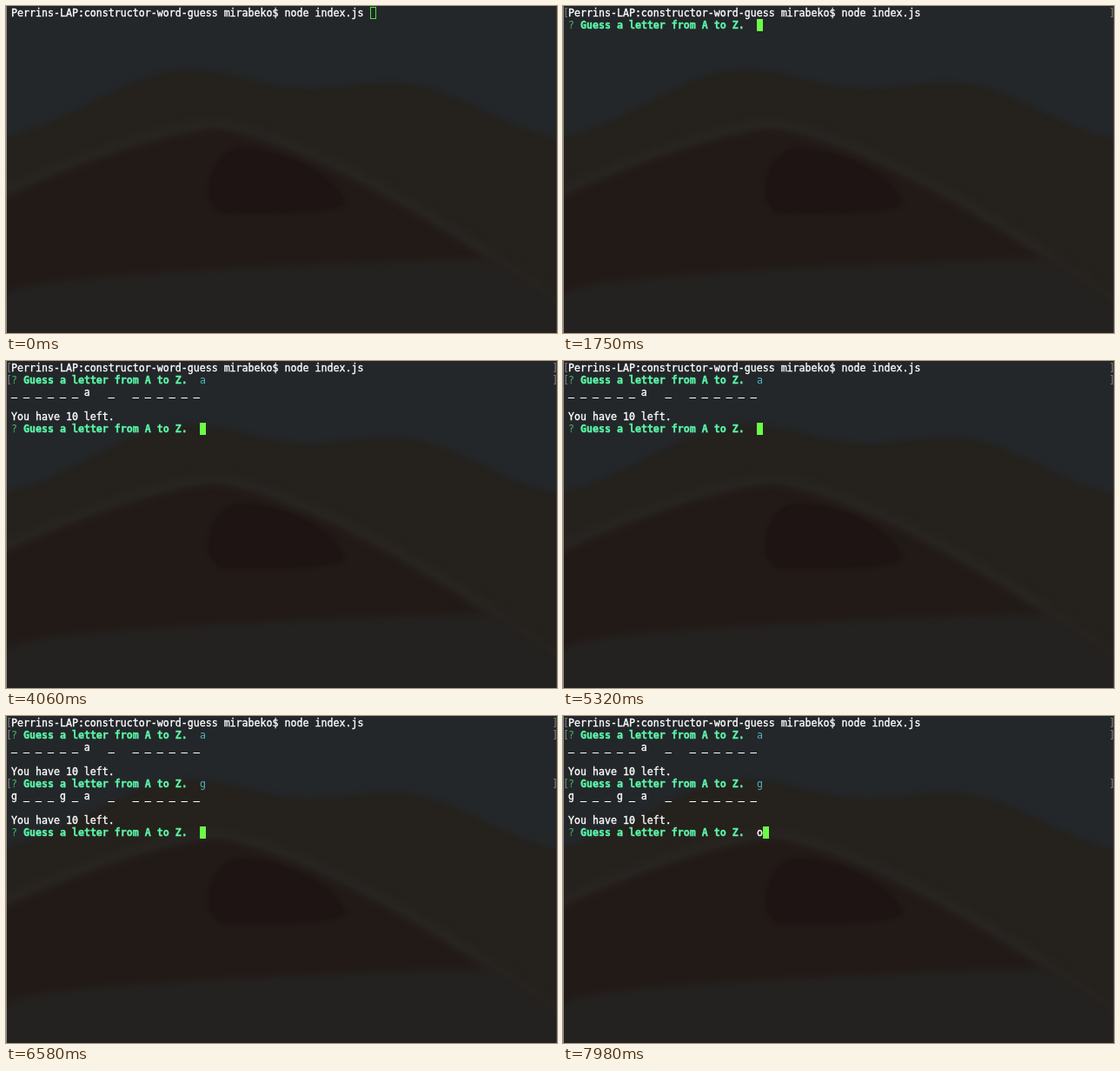
Animation of 634x376 px, one loop 8000 ms. Source, as an HTML page with a canvas:

```html
<!DOCTYPE html>
<html lang="en">
<head>
<meta charset="utf-8">
<title>Word guess terminal</title>
<style>
  html, body { margin: 0; width: 100%; height: 100%; overflow: hidden; background: #211c1a; }
  #stage { position: relative; width: 634px; height: 376px; overflow: hidden; }
  canvas { position: absolute; left: 0; top: 0; }
  span {
    position: absolute; white-space: pre; color: #fff;
    font: 11.627px/14px "DejaVu Sans Mono", "Noto Sans Mono", monospace;
    -webkit-text-stroke: .35px currentColor;
  }
  .mark { color: #43b866; -webkit-text-stroke: 0; }
  .ask { color: #5cf7a8; font-weight: bold; }
  .answer { color: #4fb2c2; -webkit-text-stroke: 0; }
  .edge { color: #85898b; -webkit-text-stroke: 0; }
  #cursor { position: absolute; box-sizing: border-box; width: 7px; height: 14px; background: #6dfc48; }
  #cursor.hollow { background: none; border: 1px solid #4fe03c; }
</style>
</head>
<body>
<div id="stage"><canvas width="634" height="376"></canvas></div>
<script>
const WIDTH = 634, HEIGHT = 376, LOOP = 8000, BLINK = 525, REDRAW = 280;
const CELL = 7, LINE = 14, LEFT = 6, TOP = 1;
const stage = document.getElementById('stage');
const ctx = stage.querySelector('canvas').getContext('2d');

// Background dunes
const bump = (x, center, width) => Math.exp(-(((x - center) / width) ** 2));
const horizon = x => 165 - 90 * bump(x, 205, 150) - 71 * bump(x, 460, 130);
const ridge = x => 138 + (x < 240 ? 77 : 102) * (Math.abs(x - 240) / 240) ** 1.4;
const foreground = x => Math.max(ridge(x), 335 - 44 * (Math.max(x, 0) / 525) ** 0.4);

function contour(height) {
  const path = new Path2D();
  for (let x = -20; x <= WIDTH + 20; x += 6) path.lineTo(x, height(x));
  return path;
}

function dune(height, color, blur) {
  const path = contour(height);
  path.lineTo(WIDTH + 20, HEIGHT + 20);
  path.lineTo(-20, HEIGHT + 20);
  ctx.filter = `blur(${blur}px)`;
  ctx.fillStyle = color;
  ctx.fill(path);
}

function drawHollow() {
  ctx.filter = 'blur(2px)';
  ctx.fillStyle = '#1d1413';
  ctx.beginPath();
  ctx.moveTo(233, 222);
  ctx.bezierCurveTo(230, 190, 248, 160, 275, 164);
  ctx.bezierCurveTo(340, 168, 385, 205, 391, 226);
  ctx.bezierCurveTo(385, 242, 270, 238, 245, 238);
  ctx.fill();
}

function drawScene() {
  ctx.fillStyle = '#23272a';
  ctx.fillRect(0, 0, WIDTH, HEIGHT);
  dune(horizon, '#25211c', 3);
  dune(ridge, '#221a17', 3);
  ctx.filter = 'blur(5px)';
  ctx.strokeStyle = '#282522';
  ctx.lineWidth = 12;
  ctx.stroke(contour(x => ridge(x) - 3));
  drawHollow();
  dune(foreground, '#242220', 4);
  ctx.filter = 'none';
  ctx.fillStyle = '#8f8d88';
  ctx.fillRect(0, 0, 1, HEIGHT);
  ctx.fillStyle = '#3a3c3d';
  ctx.fillRect(WIDTH - 1, 0, 1, HEIGHT);
}

// Terminal text
const items = [];

function place(el, row, col) {
  el.style.left = LEFT + col * CELL + 'px';
  el.style.top = TOP + row * LINE + 'px';
}

function write(row, col, text, start = 0, end = LOOP, kind = '') {
  const el = document.createElement('span');
  el.textContent = text;
  el.className = kind;
  place(el, row, col);
  stage.append(el);
  items.push({ el, start, end });
}

function brackets(row, start) {
  write(row, -0.85, '[', start, LOOP, 'edge');
  write(row, 88.9, ']', start, LOOP, 'edge');
}

const question = 'Guess a letter from A to Z.';
const answerCol = question.length + 4;

function prompt(row, start, end) {
  write(row, 0, '?', start, end, 'mark');
  write(row, 2, question, start, end, 'ask');
}

const board = guessed => [...'g___g_a _ ______']
  .map(c => c === ' ' || guessed.includes(c) ? c : '_').join(' ');

const command = 'Perrins-LAP:constructor-word-guess mirabeko$ node index.js ';

// Each input line: shown, starts blinking at settle, gets its letter, then enter
const inputs = [
  { row: 0, col: command.length, shown: 0, settle: 280, enter: 1330 },
  { letter: 'a', shown: 1750, settle: 2135, typed: 3290, enter: 3710 },
  { letter: 'g', settle: 3955, typed: 5810, enter: 6020 },
  { letter: 'o', settle: 6420, typed: 7630, enter: LOOP }
];

function layOut() {
  write(0, 0, command);
  brackets(0, inputs[0].enter);
  let guessed = '';
  inputs.slice(1).forEach((input, i) => {
    const { letter, typed, enter } = input;
    const row = input.row = 1 + 4 * i;
    const done = enter + REDRAW;
    input.col = answerCol;
    input.shown ??= inputs[i].enter + REDRAW;
    guessed += letter;
    prompt(row, input.shown, enter);
    write(row, answerCol, letter, typed, enter);
    prompt(row, done);
    write(row, answerCol, letter, done, LOOP, 'answer');
    brackets(row, done);
    write(row + 1, 0, board(guessed), done);
    write(row + 3, 0, 'You have 10 left.', done);
  });
}

drawScene();
layOut();
const cursor = document.createElement('div');
cursor.id = 'cursor';
stage.append(cursor);

function drawCursor(t) {
  const { row, col, settle, typed, enter } = inputs.findLast(input => input.shown <= t);
  const entered = t >= enter;
  const blinks = Math.floor(Math.max(0, t - settle) / BLINK);
  cursor.hidden = !entered && blinks % 2 === 1;
  cursor.className = t < inputs[0].settle ? 'hollow' : '';
  if (entered) place(cursor, Math.max(row, 1), 0);
  else place(cursor, row, col + (t >= typed ? 1 : 0));
}

const origin = performance.now();
function tick() {
  const t = (performance.now() - origin) % LOOP;
  for (const { el, start, end } of items) el.hidden = t < start || t >= end;
  drawCursor(t);
  requestAnimationFrame(tick);
}
tick();
</script>
</body>
</html>
```
